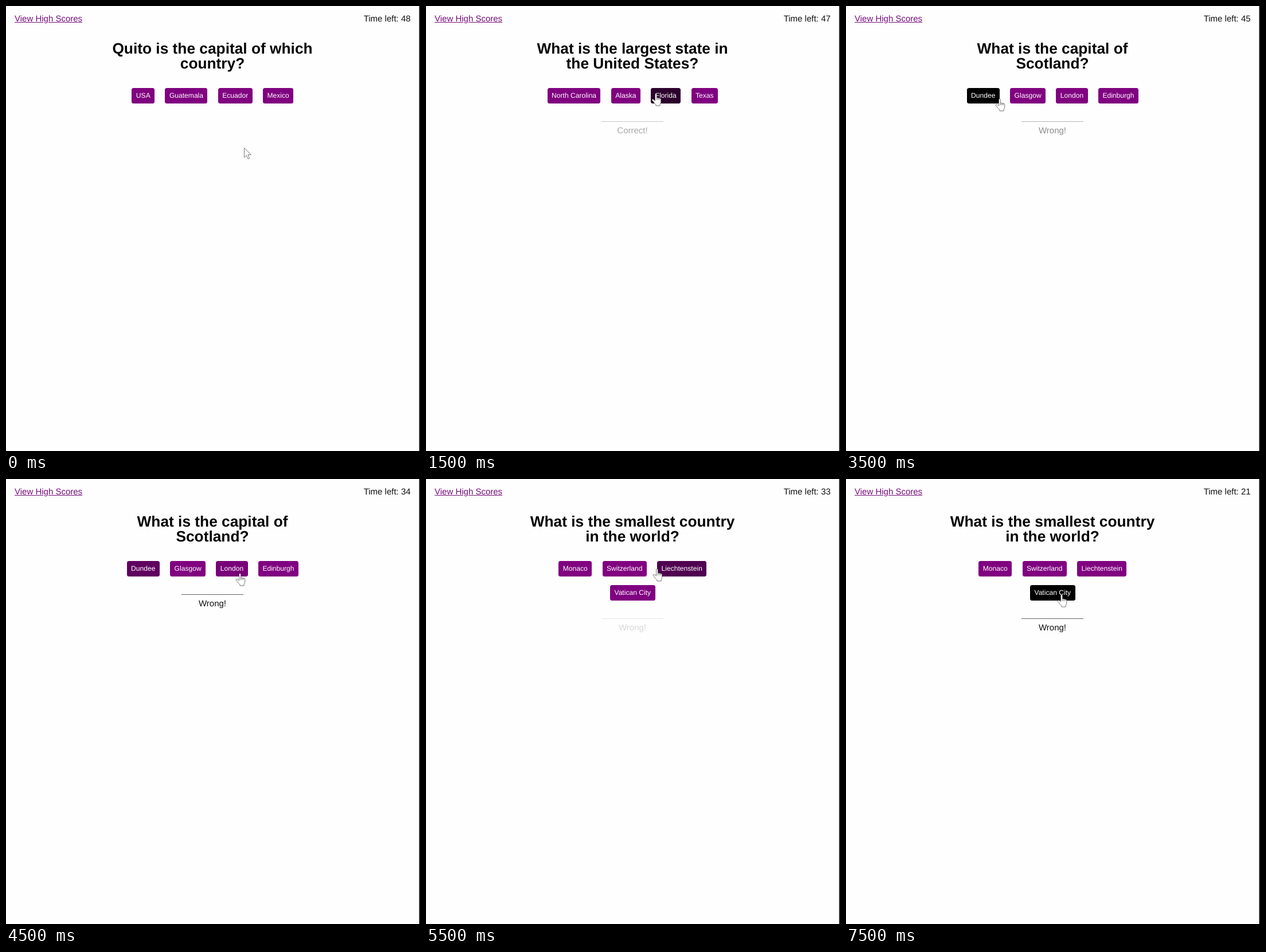
An HTML page for the animation above (8000 ms loop, 722 px wide and 776 px high).

```html
<!DOCTYPE html>
<html lang="en">
<head>
<meta charset="utf-8">
<title>Quiz</title>
<style>
html, body { margin: 0; width: 100%; height: 100%; overflow: hidden; background: #fefefe; }
body { position: relative; font: 15px/17px "Liberation Sans", Arial, sans-serif; color: #111; text-rendering: geometricPrecision; }
.link, .timer, h1, .answers, .result, .edge, svg { position: absolute; }
.link { left: 15px; top: 14px; color: #75107a; text-decoration: underline; }
.timer { right: 16.4px; top: 14px; white-space: nowrap; }
h1 { left: 160px; top: 60.6px; width: 400px; margin: 0; font-size: 26.3px; line-height: 26.4px; text-align: center; white-space: pre; color: #050505; }
.answers { left: 190.3px; top: 143px; width: 340px; display: flex; flex-wrap: wrap; justify-content: center; gap: 15px 18.4px; }
.answers span { height: 27px; padding: 0 7.4px; border-radius: 3.5px; font-size: 12.1px; line-height: 27px; color: #fff; white-space: nowrap; }
.result { left: 306px; width: 108px; border-top: 1px solid #666; padding-top: 7px; text-align: center; }
.edge { left: 720px; top: 0; width: 1px; height: 100%; background: #999; border-right: 1px solid #000; }
svg { left: 0; top: 0; overflow: visible; fill: #fff; stroke: #555; stroke-width: .8; stroke-linejoin: round; }
</style>
</head>
<body>
<div class="link">View High Scores</div>
<div class="timer"></div>
<h1></h1>
<div class="answers"></div>
<div class="result"></div>
<div class="edge"></div>
<svg id="arrow" width="14" height="21"><path d="M.5.5V17L4.3 13.4 7 19.6 9.6 18.5 7 12.4H12.4Z"/></svg>
<svg id="hand" width="18" height="23"><path d="M6.6 13V2.2a1.4 1.4 0 0 1 2.8 0V8.2q1.3-1 2.4.3 1.3-.8 2.3.5 2.4-.6 2.6 1.7V15q0 2.4-1.6 4.4V22H8V20.2Q5.2 18 3.6 15L1 12.2Q.6 10.6 2.5 10.5 4.5 11 6.6 13Z"/><path d="M9.4 8V12M11.8 8.5V12M14.1 9V12" fill="none"/></svg>
<script>
const LOOP = 8000, STEP = 500, FADE = 1000, START_SECONDS = 48, PENALTY = 10;

// "start" is the click that opens the question; "result" judges the one before
const questions = [
  { start: 0, title: "Quito is the capital of which\ncountry?", answers: ["USA", "Guatemala", "Ecuador", "Mexico"] },
  { start: 1140, result: "Correct!", title: "What is the largest state in\nthe United States?", answers: ["North Carolina", "Alaska", "Florida", "Texas"] },
  { start: 3020, result: "Wrong!", title: "What is the capital of\nScotland?", answers: ["Dundee", "Glasgow", "London", "Edinburgh"] },
  { start: 5340, result: "Wrong!", title: "What is the smallest country\nin the world?", answers: ["Monaco", "Switzerland", "Liechtenstein", "Vatican City"] }
];

// The pointer rests at each stop from "from" to "to" and glides between stops
const stops = [
  { from: 0, to: 0, x: 415, y: 247 },
  { from: 500, to: 1720, x: 393, y: 152 },
  { from: 1800, to: 3760, x: 260, y: 161 },
  { from: 4440, to: 4600, x: 400, y: 164 },
  { from: 5000, to: 5600, x: 395, y: 156 },
  { from: 6300, to: LOOP, x: 368, y: 201 }
];

const hovers = [
  { slot: 2, enter: 840, leave: 1720 },
  { slot: 0, enter: 1800, leave: 3760 },
  { slot: 2, enter: 4440, leave: 5160 },
  { slot: 3, enter: 6300, leave: LOOP }
];

const find = s => document.querySelector(s);
const timer = find(".timer"), title = find("h1"), answers = find(".answers"), result = find(".result");
const arrow = find("#arrow"), hand = find("#hand");
const ramp = (t, start, length) => Math.min(1, Math.max(0, (t - start) / length));

function pointerAt(t) {
  const next = stops.findIndex(stop => t <= stop.to);
  const b = stops[next], a = stops[next - 1] || b;
  const k = a === b ? 1 : ramp(t, a.to, b.from - a.to);
  return { x: a.x + (b.x - a.x) * k, y: a.y + (b.y - a.y) * k };
}

function darkness(slot, t) {
  const levels = hovers.filter(h => h.slot === slot).map(h =>
    ramp(Math.min(t, h.leave), h.enter, FADE) - Math.max(0, t - h.leave) / FADE);
  return Math.max(0, ...levels);
}

function secondsLeft(t) {
  const tick = Math.floor(t / 1000);
  const misses = questions.filter(q => q.result === "Wrong!" && q.start < tick * 1000).length;
  return START_SECONDS - tick - PENALTY * misses;
}

function place(el, { x, y }, shown) {
  el.style.transform = `translate(${x}px, ${y}px)`;
  el.style.visibility = shown ? "visible" : "hidden";
}

function draw(t) {
  const question = questions.filter(q => q.start <= t).pop();
  timer.textContent = "Time left: " + secondsLeft(t);
  title.textContent = question.title;
  answers.replaceChildren(...question.answers.map((text, slot) => {
    const button = document.createElement("span");
    const level = Math.round(128 * (1 - darkness(slot, t)));
    button.textContent = text;
    button.style.background = `rgb(${level}, 0, ${level})`;
    return button;
  }));
  result.textContent = question.result || "";
  result.style.top = answers.offsetTop + answers.offsetHeight + 31 + "px";
  result.style.opacity = question.result ? ramp(t, question.start, FADE) : 0;
  const pointer = pointerAt(t);
  const pointing = t >= stops[1].from;
  place(arrow, pointer, !pointing);
  place(hand, pointer, pointing);
}

let shown = -1;
function frame() {
  const t = Math.floor(performance.now() % LOOP / STEP) * STEP;
  if (t !== shown) draw(shown = t);
  requestAnimationFrame(frame);
}
frame();
</script>
</body>
</html>
```
